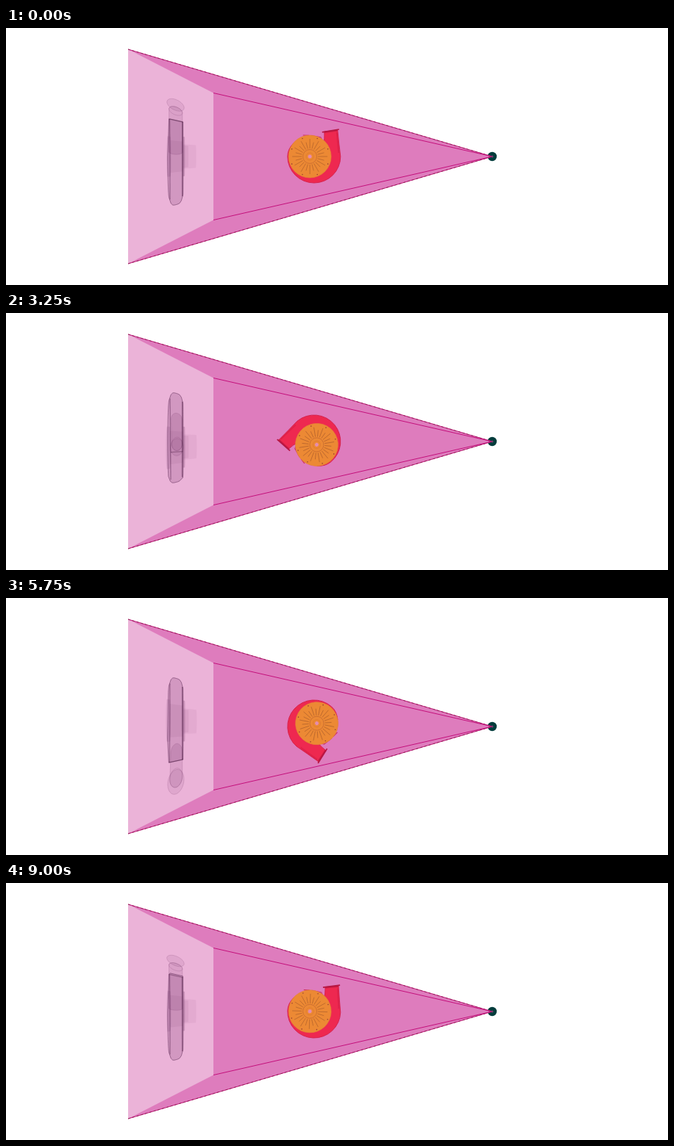
An HTML page with a canvas that plays this animation: 900 px wide and 350 px high, repeating every 9.05 s.

```html
<!DOCTYPE html>
<html lang="en">
<head>
<meta charset="utf-8">
<title>Rotating pump in a cone beam</title>
<style>
  html, body { margin: 0; width: 100%; height: 100%; overflow: hidden; background: #fff; }
  canvas { display: block; }
</style>
</head>
<body>
<canvas id="stage" width="900" height="350"></canvas>
<script>
const ctx = document.getElementById('stage').getContext('2d');
const STEP = 50, STEPS = 181, TAU = Math.PI * 2;
const AXIS_Y = 175, PUMP_X = 418.8, SOURCE_X = 661;
const OUTLET = [22.5, -35], ELBOW = [25.5, -3], DISC_X = -5.7;
const MID_Z = 7;
let angle = 0;

const range = n => Array.from({ length: n }, (_, i) => i);

function trace(points, close = true) {
  ctx.beginPath();
  points.forEach(([x, y]) => ctx.lineTo(x, y));
  if (close) ctx.closePath();
}

function paint(points, fill, stroke, width = 1) {
  trace(points);
  if (fill) { ctx.fillStyle = fill; ctx.fill(); }
  if (stroke) { ctx.strokeStyle = stroke; ctx.lineWidth = width; ctx.stroke(); }
}

function line(points, color, width = 1) {
  trace(points, false);
  ctx.strokeStyle = color;
  ctx.lineWidth = width;
  ctx.stroke();
}

function circle(x, y, r, fill, stroke, width = 1) {
  ctx.beginPath();
  ctx.arc(x, y, r, 0, TAU);
  if (fill) { ctx.fillStyle = fill; ctx.fill(); }
  if (stroke) { ctx.strokeStyle = stroke; ctx.lineWidth = width; ctx.stroke(); }
}

// Cone-beam projection of a pump point onto the tilted detector.
function project([x, y, z]) {
  const c = Math.cos(angle), s = Math.sin(angle);
  const px = x * c + y * s, py = y * c - x * s;
  const zoom = 423 / (242 - px);
  const depth = 1 / (1 - z * zoom / 430);
  return [450 - 212 * depth, AXIS_Y + py * zoom * depth];
}

function hull(points) {
  const sorted = [...points].sort((a, b) => a[0] - b[0] || a[1] - b[1]);
  const half = list => {
    const out = [];
    for (const p of list) {
      while (out.length > 1) {
        const [a, b] = out.slice(-2);
        if ((b[0] - a[0]) * (p[1] - a[1]) - (b[1] - a[1]) * (p[0] - a[0]) > 0) break;
        out.pop();
      }
      out.push(p);
    }
    return out.slice(0, -1);
  };
  return [...half(sorted), ...half(sorted.reverse())];
}

const shadowOf = points => hull(points.map(project));

// Ring facing the viewer, around the shaft.
const shaftRing = (r, z) => range(24).map(i => {
  const a = i / 24 * TAU;
  return [DISC_X + r * Math.cos(a), r * Math.sin(a), z];
});

// Ring across the outlet pipe.
const pipeRing = ([x, y], r) => range(28).map(i => {
  const a = i / 28 * TAU, d = r * Math.cos(a);
  return [x + d * 0.985, y - d * 0.17, MID_Z + r * Math.sin(a)];
});

const drum = (r, z0, z1) => [...shaftRing(r, z0), ...shaftRing(r, z1)];

const casing = range(9).flatMap(i => {
  const q = i / 4 - 1, r = 36 - 6 * q ** 4, z = MID_Z + 10 * q;
  const arc = range(31).map(k => [r * Math.cos(k * Math.PI / 30), r * Math.sin(k * Math.PI / 30), z]);
  return [...arc, [-15, -29, z], [10, -26, z]];
});
const wall = (r, z) => [...range(25).map(k => [r * Math.cos(k * Math.PI / 24), r * Math.sin(k * Math.PI / 24), z]),
  [-15, -28, z], [10, -26, z]];

function wallLine(z, color, width) {
  const ys = wall(31, z).map(project).sort((a, b) => a[1] - b[1]);
  line([ys[0], ys[ys.length - 1]], color, width);
}

function drawScene() {
  ctx.fillStyle = '#fff';
  ctx.fillRect(0, 0, 900, 350);
  circle(SOURCE_X, AXIS_Y, 6.2, '#033c3c');
  paint([[166, 29], [SOURCE_X, AXIS_Y], [166, 321]], '#de7cbd');
  paint([[166, 29], [282, 88.5], [282, 261.5], [166, 321]], '#ebb3d8');
  for (const side of [-1, 1]) {
    const outer = [[166, AXIS_Y + side * 146], [SOURCE_X, AXIS_Y]];
    line(outer, '#c4187a', 1);
    ctx.setLineDash([3, 3]);
    line(outer, '#8e2456', 0.9);
    ctx.setLineDash([]);
    line([[282, AXIS_Y + side * 86.5], [SOURCE_X, AXIS_Y]], '#c4107c', 1);
  }
  circle(SOURCE_X, AXIS_Y, 1.6, '#7d3b68');
}

function drawShadow() {
  const facing = Math.max(0, Math.sin(angle + 0.1));
  paint(shadowOf(drum(10, -26, -4)), 'rgba(125,60,112,.07)');
  paint(shadowOf(drum(16, -6, -3)), 'rgba(110,50,98,.24)');
  paint(shadowOf(drum(9, -12, -4)), 'rgba(110,50,98,.08)');
  paint(shadowOf(drum(15, 16, 20)), 'rgba(110,50,98,.13)');

  const mouth = pipeRing(OUTLET, 11.5);
  const neck = pipeRing([22.8, -31], 9);
  paint(shadowOf([...pipeRing(ELBOW, 9), ...neck]), 'rgba(120,55,108,.15)', 'rgba(100,45,88,.2)', 0.8);
  paint(shadowOf(mouth), 'rgba(120,55,108,.10)', 'rgba(110,50,98,.17)', 1);
  paint(shadowOf(neck), null, 'rgba(110,50,98,.22)', 0.8);

  paint(shadowOf(casing), 'rgba(120,55,108,.22)', 'rgba(85,35,75,.48)', 1);
  paint(shadowOf(drum(12, -3, 16)), 'rgba(120,55,108,.08)');
  wallLine(16, 'rgba(80,30,70,.38)', 1.4);
  wallLine(-2, 'rgba(80,30,70,.48)', 1.6);
  const lip = [-3, 17].map(z => project([10, -26, z]));
  line(lip, 'rgba(75,28,65,.38)', 1.3);
  if (facing > 0.8) paint(shadowOf(neck), `rgba(246,212,234,${(facing - 0.8) * 2.6})`);
}

function drawPump() {
  ctx.save();
  ctx.translate(PUMP_X, AXIS_Y);
  ctx.rotate(-angle);

  ctx.beginPath();
  ctx.moveTo(14, -34);
  ctx.lineTo(32, -36);
  ctx.quadraticCurveTo(34, -16, 36, 0);
  ctx.arc(0, 0, 36, 0, Math.PI);
  ctx.quadraticCurveTo(-36, -10, -28, -18);
  ctx.lineTo(12, -16);
  ctx.quadraticCurveTo(15, -24, 14, -34);
  ctx.fillStyle = '#ee2850';
  ctx.fill();
  ctx.strokeStyle = '#d5204a';
  ctx.lineWidth = 0.9;
  ctx.stroke();
  line([[31, -33], [32.5, -17], [33.5, -5]], '#df2149', 2);
  line([[14, -33], [32, -35.5]], '#cb1b44', 2);
  line([[11, -33.2], [34, -37]], '#b51642', 1.7);

  line([[-15, -29], [-7, -28.6]], '#cc2b58', 1.2);
  line([[-4, -28.5], [9, -26.2]], '#c52c65', 1.1);
  line([[9, -26.5], [11, -22]], '#c52c65', 1);

  ctx.translate(DISC_X, 0);
  circle(0, 0, 29, '#ec8934', '#e58036', 0.6);
  for (const i of range(24)) {
    const a = i / 24 * TAU, r = i % 2 ? 20 : 24;
    line([[11 * Math.cos(a), 11 * Math.sin(a)], [r * Math.cos(a), r * Math.sin(a)]], '#b7652d', 0.8);
  }
  circle(0, 0, 9.5, null, '#c76b31', 0.8);
  circle(0, 0, 5, null, '#d9742d', 0.6);
  for (const i of range(8)) {
    const a = (i + 0.5) / 8 * TAU;
    circle(26.5 * Math.cos(a), 26.5 * Math.sin(a), 0.8, '#983f32');
  }
  circle(0, 0, 2.5, '#e58cae');
  ctx.restore();
}

function render(now) {
  angle = Math.floor(now / STEP) % STEPS / STEPS * TAU;
  drawScene();
  drawShadow();
  drawPump();
  requestAnimationFrame(render);
}
render(performance.now());
</script>
</body>
</html>
```
